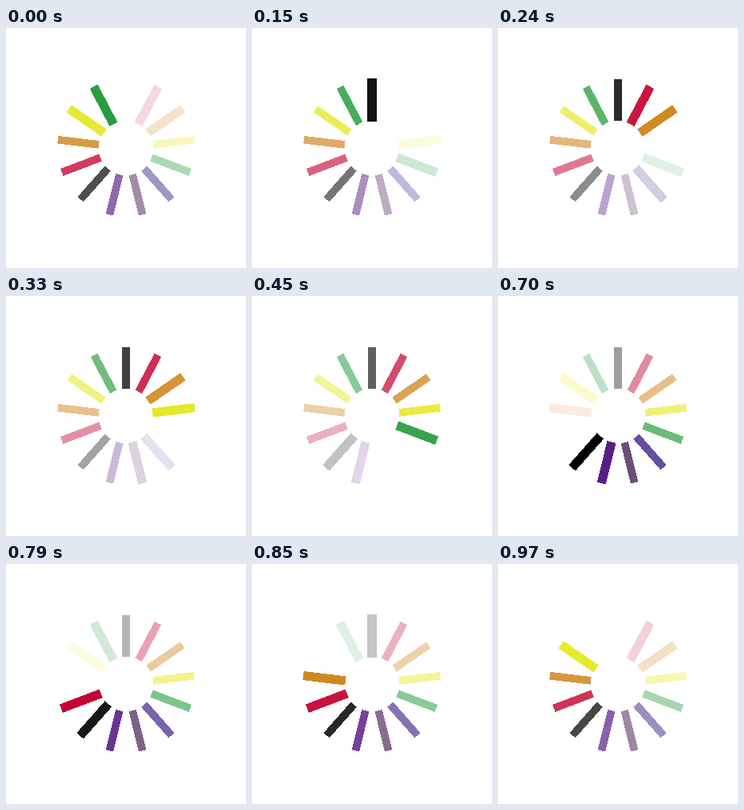
Write an HTML page that moves like this. It is 300 by 300 pixels and loops after 1 s.

```html
<!DOCTYPE html>
<html lang="en">
<head>
<meta charset="utf-8">
<title>Spinner</title>
<style>
  html, body { margin: 0; width: 100%; height: 100%; overflow: hidden; background: #fff; }
  svg { display: block; width: 100vw; height: 100vh; }
</style>
</head>
<body>
<svg viewBox="0 0 300 300" shape-rendering="crispEdges"></svg>
<script>
const colors = [
  '#000000', '#c2002f', '#d18822', '#e6e824', '#289d40', '#361a82', '#522e5e',
  '#4b0a7b', '#000000', '#c2002f', '#d18822', '#e6e824', '#289d40'
];
const count = colors.length;
const steps = 33;
const radius = 60;
const svg = document.querySelector('svg');

const bars = colors.map((color, i) => {
  const bar = document.createElementNS('http://www.w3.org/2000/svg', 'rect');
  bar.setAttribute('fill', color);
  bar.setAttribute('transform', `translate(150 150) rotate(${i * 360 / count})`);
  svg.append(bar);
  return bar;
});

// 30 ms steps, with one 40 ms step just before 550 ms
function stepAt(ms) {
  return ms < 550 ? Math.min(17, Math.floor(ms / 30)) : Math.floor((ms - 10) / 30);
}

function setSize(bar, w, h) {
  bar.setAttribute('x', -w / 2);
  bar.setAttribute('y', -radius - h / 2);
  bar.setAttribute('width', w);
  bar.setAttribute('height', h);
}

function draw(now) {
  const t = stepAt(now % 1000) / steps;
  bars.forEach((bar, i) => {
    const age = (t - (i + 1) / count + 1) % 1;
    const wide = age < 0.12 || age > 0.72;
    setSize(bar, wide ? 11.2 : 9.6, wide ? 53.2 : 51.6);
    bar.setAttribute('fill-opacity', age < 0.88 ? 1 - age : 0);
  });
}

const start = performance.now();
function loop() {
  draw(performance.now() - start);
  requestAnimationFrame(loop);
}
loop();
</script>
</body>
</html>
```
